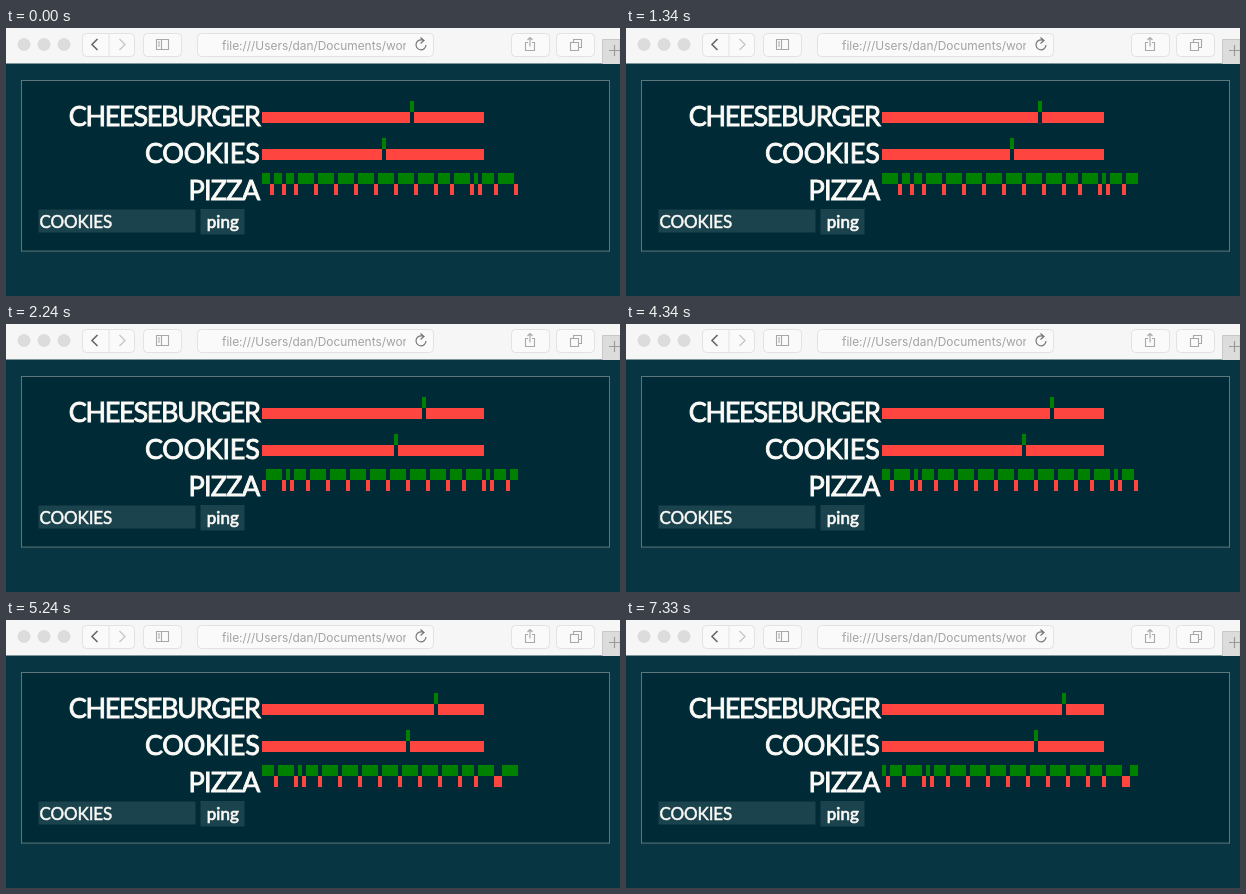
An HTML page for the animation above (8000 ms loop, 614 by 268 pixels).

```html
<!DOCTYPE html>
<html lang="en">
<head>
<meta charset="utf-8">
<title>Ping</title>
<style>
  html, body { margin: 0; width: 100%; height: 100%; overflow: hidden; background: #073642; }
  svg { display: block; }
  .crisp { shape-rendering: crispEdges; }
  .label, .field { font-family: Lato, sans-serif; fill: #fcfbf8; stroke: #fcfbf8; }
  .label { font-size: 27px; text-anchor: end; stroke-width: .9px; }
  .field { font-size: 17px; stroke-width: .5px; }
  .url { font: 11.9px Inter, "Liberation Sans", sans-serif; fill: #a2a2a2; }
  .button { fill: #fafafa; stroke: #e2e2e2; }
  .icon { fill: none; stroke: #a8a8a8; stroke-width: 1.1; }
  .on { fill: #008000; }
  .off { fill: #ff4540; }
</style>
</head>
<body>
<svg width="614" height="268" viewBox="0 0 614 268">
  <defs><clipPath id="urlClip"><rect x="200" y="6" width="200" height="22"/></clipPath></defs>

  <rect width="614" height="268" fill="#073642"/>

  <!-- browser bar -->
  <rect width="614" height="35.500" fill="#f6f6f6"/>
  <g fill="#dcdcdc" stroke="#d4d4d4" stroke-width=".6">
    <circle cx="18" cy="16.500" r="6"/>
    <circle cx="38" cy="16.500" r="6"/>
    <circle cx="58" cy="16.500" r="6"/>
  </g>
  <g class="button">
    <rect x="76.500" y="5.500" width="52" height="23" rx="4"/>
    <path d="M103 5.500V28.500"/>
    <rect x="137.500" y="5.500" width="38" height="23" rx="4"/>
    <rect x="191.500" y="5.500" width="236" height="23" rx="4"/>
    <rect x="505.500" y="5.500" width="38" height="23" rx="4"/>
    <rect x="550.500" y="5.500" width="38" height="23" rx="4"/>
  </g>
  <path class="icon" d="M91.500 11L86 16.500L91.500 22" style="stroke:#666;stroke-width:1.6"/>
  <path class="icon" d="M113.500 11L119 16.500L113.500 22" style="stroke:#c8c8c8;stroke-width:1.4"/>
  <path class="icon" d="M150.500 11.500H162.500V21.500H150.500ZM155.500 11.500V21.500M152 14H154M152 16H154M152 18H154"/>
  <text class="url" x="216" y="21.500" clip-path="url(#urlClip)">file:///Users/dan/Documents/wor</text>
  <path class="icon" d="M417.500 12.500A5 5 0 1 0 420 17M414.500 9.500L418 12.500L414.500 15.500" style="stroke:#777;stroke-width:1.2"/>
  <path class="icon" d="M522 14.500H519.500V22.500H528.500V14.500H526M524 18.500V9.500M521.500 12L524 9.500L526.500 12"/>
  <path class="icon" d="M564.500 14.500H572.500V22.500H564.500ZM567.500 14.500V11.500H575.500V19.500H572.500"/>
  <path d="M596.500 36V11.500H614V36" fill="#dcdcdc" stroke="#c8c8c8"/>
  <path class="icon" d="M603 22.500H614M608.500 17V28" style="stroke:#999"/>

  <!-- panel -->
  <rect x="15.500" y="52.500" width="588" height="170.600" fill="#002b36" stroke="#5d757c"/>
  <text class="label" x="253.500" y="98" letter-spacing="-1.300">CHEESEBURGER</text>
  <text class="label" x="253.500" y="135" letter-spacing="-.3">COOKIES</text>
  <text class="label" x="253.500" y="172" letter-spacing="-.7">PIZZA</text>
  <g fill="#1b434e">
    <rect x="32.500" y="181.500" width="157" height="23"/>
    <rect x="194.500" y="181" width="44" height="25.500"/>
  </g>
  <text class="field" x="33.500" y="200" letter-spacing="-.1">COOKIES</text>
  <text class="field" x="200.800" y="200" style="stroke-width:.7px">ping</text>
  <path id="on" class="on crisp"/>
  <path id="off" class="off crisp"/>
</svg>

<script>
const LOOP = 8000;
const STEPS = [290, 1340, 2240, 3290, 4340, 5240, 6290, 7330];
const LEFT = 256, CELL = 4, HALF = 11, CELLS = 64, BAR_END = 478;

// Start cells of the gaps in the pizza row; negative ones enter later.
const GAPS = [-7, -3, 2, 5, 8, 13, 18, 23, 28, 33, 38, 43, 47, 52, 54, 58, 63];
// Gaps that miss one move: start cell -> step at which they wait.
const WAITS = { 5: 3, 54: 6 };

const onPath = document.getElementById("on");
const offPath = document.getElementById("off");

const box = (x, y, w) => `M${x} ${y}h${w}v${HALF}h${-w}z`;

function pulseRow(y, x) {
  const after = x + CELL;
  return {
    on: box(x, y, CELL),
    off: box(LEFT, y + HALF, x - LEFT) + box(after, y + HALF, BAR_END - after)
  };
}

function trainRow(y, step) {
  const gaps = new Set(GAPS.map(c => c + step - (step >= WAITS[c] ? 1 : 0)));
  let on = "", off = "";
  for (let c = 0; c < CELLS; c++) {
    const x = LEFT + c * CELL;
    if (gaps.has(c)) off += box(x, y + HALF, CELL);
    else on += box(x, y, CELL);
  }
  return { on, off };
}

function draw(step) {
  const rows = [
    pulseRow(73, 404 + step * CELL),
    pulseRow(110, 376 + step * CELL),
    trainRow(145, step)
  ];
  onPath.setAttribute("d", rows.map(r => r.on).join(""));
  offPath.setAttribute("d", rows.map(r => r.off).join(""));
}

function tick() {
  const t = performance.now() % LOOP;
  draw(STEPS.filter(s => s <= t).length);
  requestAnimationFrame(tick);
}
tick();
</script>
</body>
</html>
```
